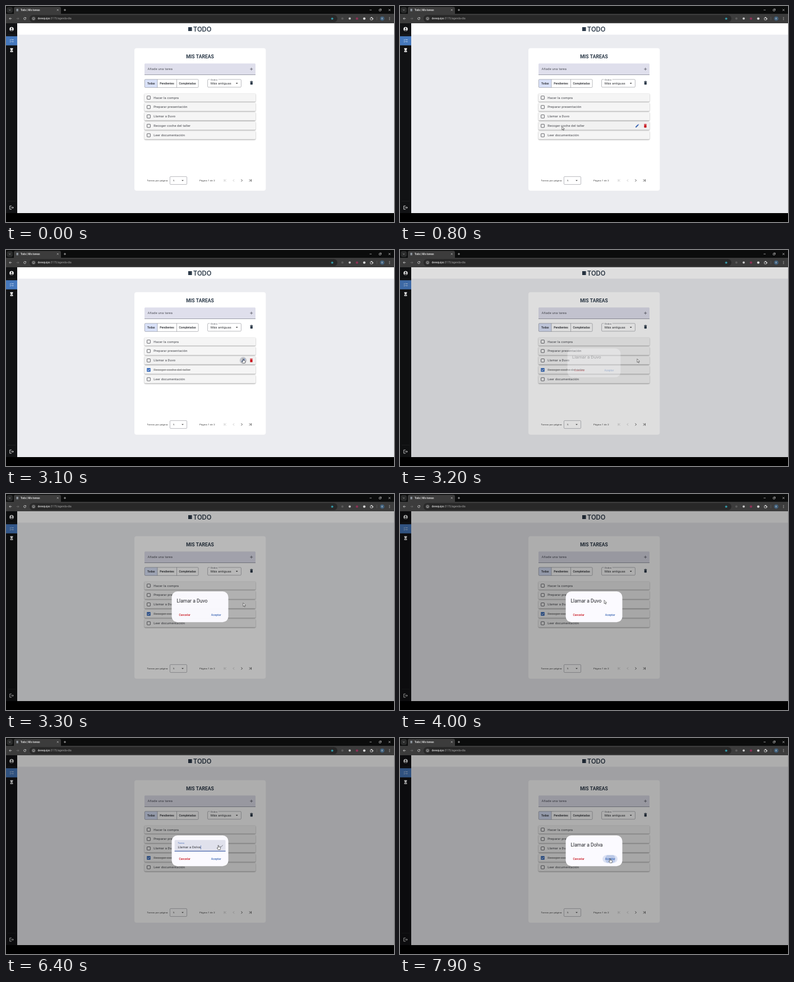
Write an HTML page with a canvas that moves like this. It is 692 px wide and 388 px high and loops after 8 s.

```html
<!DOCTYPE html>
<html lang="es">
<head>
<meta charset="utf-8">
<title>Mis tareas</title>
<style>
html, body { margin: 0; width: 100%; height: 100%; overflow: hidden; background: #000; }
canvas { display: block; width: 100vw; height: 100vh; }
</style>
</head>
<body>
<canvas id="stage"></canvas>
<script>
const W = 692, H = 388, LOOP = 8000;
const canvas = document.getElementById('stage');
const c = canvas.getContext('2d');
const INK = '#2c3a49', TEXT = '#3d3f45', BLUE = '#3b66b4', RED = '#c8101a', LINE = '#74777f';
const OLD_NAME = 'Duvo', NEW_NAME = 'Dolva', CALL = 'Llamar a ';
const OPEN = 3150, EDIT = 4080, SAVE = 6700;
const TASKS = ['Hacer la compra', 'Preparar presentación', CALL + OLD_NAME,
  'Recoger coche del taller', 'Leer documentación'];

const clamp = v => Math.max(0, Math.min(1, v));
const span = (t, a, b) => clamp((t - a) / (b - a));
const mix = (a, b, u) => a + (b - a) * u;
const smooth = u => u * u * (3 - 2 * u);
const rowY = i => 157.2 + i * 16.9;

function bezier(x1, y1, x2, y2) {
  const at = (a, b, s) => 3 * a * s * (1 - s) ** 2 + 3 * b * s * s * (1 - s) + s ** 3;
  return x => {
    let lo = 0, hi = 1;
    for (let i = 0; i < 20; i++) {
      const mid = (lo + hi) / 2;
      if (at(x1, x2, mid) < x) lo = mid; else hi = mid;
    }
    return at(y1, y2, lo);
  };
}
const fadeEase = bezier(.25, .8, .25, 1);
const growEase = bezier(0, 0, .2, 1);

function rect(x, y, w, h, color) {
  c.fillStyle = color;
  c.fillRect(x, y, w, h);
}
function round(x, y, w, h, r, fill, stroke, lw = .5) {
  c.beginPath();
  c.roundRect(x, y, w, h, r);
  if (fill) { c.fillStyle = fill; c.fill(); }
  if (stroke) { c.strokeStyle = stroke; c.lineWidth = lw; c.stroke(); }
}
function disc(x, y, r, color) {
  c.beginPath();
  c.arc(x, y, r, 0, 7);
  c.fillStyle = color;
  c.fill();
}
function ring(x, y, r, color, lw, a = 0, b = 7) {
  c.beginPath();
  c.arc(x, y, r, a, b);
  c.strokeStyle = color;
  c.lineWidth = lw;
  c.stroke();
}
// Points are offsets from (x, y).
function trace(x, y, pts, close) {
  c.beginPath();
  for (let i = 0; i < pts.length; i += 2) c.lineTo(x + pts[i], y + pts[i + 1]);
  if (close) c.closePath();
}
function line(x, y, pts, color, lw = .8) {
  trace(x, y, pts);
  c.strokeStyle = color;
  c.lineWidth = lw;
  c.stroke();
}
function poly(x, y, pts, color) {
  trace(x, y, pts, true);
  c.fillStyle = color;
  c.fill();
}
function text(s, x, cy, size, color, weight = 400, gap = 0, font = 'Roboto') {
  c.font = `${weight} ${size}px ${font}, sans-serif`;
  c.letterSpacing = gap + 'px';
  c.fillStyle = color;
  c.fillText(s, x, cy + size * .355);
  return c.measureText(s).width;
}

const plus = (x, y, r, color, lw) => {
  line(x, y, [-r, 0, r, 0], color, lw);
  line(x, y, [0, -r, 0, r], color, lw);
};
const drop = (x, y) => poly(x, y, [-1.8, -.9, 1.8, -.9, 0, .9], '#333');
const tick = (x, y, r, color, lw) => line(x, y, [-r, 0, -r * .3, r * .7, r, -r * .7], color, lw);
function trash(x, y, color) {
  rect(x - 2.5, y - 3, 5, .8, color);
  rect(x - 1, y - 3.4, 2, .6, color);
  round(x - 2.1, y - 1.8, 4.2, 5, .6, color);
}
function pencil(x, y) {
  poly(x, y, [-3, 3, -3, 1.6, 1, -2.4, 2.4, -1, -1.6, 3], BLUE);
  poly(x, y, [1.5, -2.8, 2.2, -3.3, 3.3, -2.2, 2.8, -1.5], BLUE);
}

function browser() {
  rect(0, 0, W, H, '#000');
  rect(0, 0, W, 14.5, '#0b0c0c');
  round(1.5, 2, 10.5, 10.5, 3, '#2b2c2c');
  line(6.7, 7.2, [-1.3, -.6, 0, .7, 1.3, -.6], '#ddd', .7);
  round(14, 1.5, 84, 15, [3, 3, 0, 0], '#3c3c3c');
  rect(0, 14, W, 17, '#3c3c3c');
  rect(18.5, 5, 3.4, 4.4, '#8d949c');
  text('Todo | Mis tareas', 26, 7.3, 4.5, '#eee', 500);
  line(92.3, 7.2, [-1.4, -1.4, 1.4, 1.4], '#ddd', .6);
  line(92.3, 7.2, [-1.4, 1.4, 1.4, -1.4], '#ddd', .6);
  plus(105, 7.2, 2, '#ddd', .7);
  line(650.3, 7.2, [-1.8, 0, 1.8, 0], '#eee', .6);
  round(665.5, 6, 3, 3, .3, null, '#eee', .6);
  line(667, 5.2, [-.3, 0, 2.3, 0, 2.3, 2.6], '#eee', .5);
  line(684, 7.2, [-1.7, -1.7, 1.7, 1.7], '#eee', .6);
  line(684, 7.2, [-1.7, 1.7, 1.7, -1.7], '#eee', .6);

  const y = 22.6;
  line(8, y, [2.2, 0, -2, 0], '#e4e4e4', .7);
  line(8, y, [-.2, -2, -2.1, 0, -.2, 2], '#e4e4e4', .7);
  line(20.8, y, [-2.2, 0, 2, 0], '#777', .7);
  line(20.8, y, [.2, -2, 2.1, 0, .2, 2], '#777', .7);
  ring(33.6, y, 2, '#e4e4e4', .7, .3, 5.6);
  poly(33.6, y, [2.4, -2.4, 2.4, -.3, .3, -.3], '#e4e4e4');
  round(42, 16.2, 549, 12.8, 6.4, '#282828');
  disc(49.2, y, 4, '#3c3c3c');
  ring(49.2, y, 2.1, '#ddd', .6);
  rect(48.9, y - .4, .6, 1.7, '#ddd');
  const w = text('devequipo', 56.4, y, 4.85, '#f2f2f2', 400);
  text(':3170/agenda-dia', 56.4 + w, y, 4.85, '#a3a3a3');
  const star = [];
  for (let i = 0; i < 10; i++) {
    const r = i % 2 ? 1.2 : 2.8, a = i * Math.PI / 5 - Math.PI / 2;
    star.push(r * Math.cos(a), r * Math.sin(a));
  }
  poly(581.8, y + .2, star, '#35a5b5');
  disc(600, y, 2, '#5b5b5b');
  disc(613, y, 2, '#c9c9c9');
  disc(626, y, 2.2, '#8c3155');
  disc(639, y, 2.2, '#d8d8d8');
  round(649.8, 21, 4, 4, .6, null, '#e4e4e4', .8);
  disc(652, 20.7, 1, '#e4e4e4');
  disc(654.2, 23, 1, '#e4e4e4');
  rect(661, 19.5, .5, 6, '#666');
  disc(671, y, 3.8, '#42617c');
  text('E', 669.8, y, 4, '#fff');
  for (const d of [-2, 0, 2]) disc(684, y + d, .55, '#e4e4e4');
}

function sidebar() {
  rect(0, 31, 20, 341, '#111214');
  rect(0, 54.3, 20, 16.4, '#4679bd');
  disc(10, 41.4, 3.7, '#fff');
  disc(10, 40.2, 1.2, '#111214');
  c.beginPath();
  c.ellipse(10, 43.5, 2.2, 1.1, 0, 0, 7);
  c.fill();
  rect(3, 51, 14, .4, '#333');
  for (const y of [60.7, 64]) {
    tick(8, y, 1.3, '#fff', .7);
    rect(10.4, y - .3, 3.2, .7, '#fff');
  }
  poly(10, 79.2, [-2.4, -3.5, 2.4, -3.5, 2.4, -1.5, .8, 0, 2.4, 1.5, 2.4, 3.5,
    -2.4, 3.5, -2.4, 1.5, -.8, 0, -2.4, -1.5], '#fff');
  poly(10, 80.5, [0, -.5, 1.4, .8, -1.4, .8], '#111214');
  rect(3, 350.5, 14, .4, '#333');
  line(9.5, 362.2, [.5, -3, -2.8, -3, -2.8, 3, .5, 3], '#fff', .8);
  line(9.5, 362.2, [-1, 0, 3.6, 0], '#fff', .8);
  line(9.5, 362.2, [2, -1.7, 3.8, 0, 2, 1.7], '#fff', .8);
}

function card() {
  rect(20, 31, W - 20, 341, '#ebecf0');
  rect(20, 31, W - 20, 20.5, '#fff');
  rect(325, 38, 6.6, 7, INK);
  text('TODO', 333.8, 41.6, 11.3, INK, 600, 0, 'Inter');
  round(229, 75.7, 234.3, 256, 4, '#fff');
  text('MIS TAREAS', 321.3, 91.2, 8.65, INK, 600);

  round(247, 103.3, 198, 20.5, [1.5, 1.5, 0, 0], '#dfdfec');
  rect(247, 123.2, 198, .6, '#6a6c78');
  text('Añade una tarea', 252.6, 113.4, 5.77, '#4a4c55', 400, .18);
  plus(437.7, 113.3, 2.5, '#44464f', .7);

  round(247.3, 131.8, 22.7, 14.6, [1.5, 0, 0, 1.5], '#d9e1f8');
  round(247.3, 131.8, 95.8, 14.6, 1.5, null, LINE);
  for (const x of [270, 304.3]) rect(x - .25, 131.8, .5, 14.6, LINE);
  text('Todas', 251.9, 139.2, 5.05, '#25272c', 500, .03);
  text('Pendientes', 274.2, 139.2, 5.05, '#25272c', 500, .03);
  text('Completadas', 308.5, 139.2, 5.05, '#25272c', 500, .03);

  round(359.6, 131.9, 59.8, 14, 1.5, null, LINE);
  rect(363.6, 131, 15, 2, '#fff');
  text('Orden', 365, 132.2, 4.3, '#4a4c55', 400, .14);
  text('Más antiguas', 365, 139, 5.77, '#26282c', 400, .18);
  drop(411.7, 139);
  trash(437.8, 138, INK);

  text('Tareas por página:', 251.6, 313.6, 4.3, '#333', 400, .14);
  round(292.4, 306.4, 30.2, 14.2, 1.5, null, LINE);
  text('5', 298, 313.6, 4.3, '#333');
  drop(315, 313.6);
  text('Página 1 de 2', 345, 313.6, 4.3, '#333', 400, .14);
  pager(391.5, -1, true, '#bbb');
  pager(406, -1, false, '#bbb');
  pager(420.5, 1, false, '#222');
  pager(435, 1, true, '#222');
}

function pager(x, dir, end, color) {
  line(x, 313.4, [-dir, -2, dir, 0, -dir, 2], color, .8);
  if (end) line(x + dir * 2.3, 313.4, [0, -2.2, 0, 2.2], color, .8);
}

function rows(t, pos) {
  TASKS.forEach((task, i) => {
    const y = rowY(i), cy = y + 7.3, done = i === 3 && t >= 1600;
    const hover = t < OPEN && pos && pos.x > 247 && pos.x < 445 && pos.y >= y && pos.y < y + 15;
    c.save();
    c.shadowColor = 'rgba(0,0,0,.45)';
    c.shadowBlur = 2;
    c.shadowOffsetY = .8;
    round(247, y, 198, 14.6, 1.4, hover ? '#f1f1f1' : '#f5f5f5');
    c.restore();

    if (i === 3) {
      const glow = span(t, 1500, 1650) * (1 - span(t, 2000, 2250));
      if (glow) disc(254.5, cy + .2, 7 * span(t, 1450, 1650), `rgba(70,85,130,${.2 * glow})`);
    }
    if (done) {
      round(251.2, cy - 3.1, 6.6, 6.6, .8, '#3f70bd');
      tick(254.5, cy + .2, 2, '#fff', .9);
    } else {
      round(251.6, cy - 2.8, 5.8, 5.8, .6, null, '#44464c', .8);
    }
    const fade = done ? span(t, 1600, 1850) : 0;
    const w = text(task, 263.2, cy, 5.77, fade > .7 ? '#858585' : fade ? '#6a6a6a' : TEXT, 400, .18);
    if (done) rect(263.2, cy + .1, w * span(t, 1600, 1820), .6, '#666');

    if (hover) {
      if (i === 2 && pos.x > 416) {
        disc(423, cy, 6.2, `rgba(50,60,85,${mix(.1, .24, span(t, 2900, 3080))})`);
      }
      pencil(423, cy);
      trash(437.5, cy, RED);
    }
  });
}

function typed(t) {
  if (t < 5000) return OLD_NAME;
  const keys = [5200, 5500, 5600, 6000, 6200];
  return NEW_NAME.slice(0, keys.filter(k => t >= k).length);
}

function caretOn(t) {
  if (t < 4200) return false;
  if (t < 5000) return t < 4700;
  return t < 5800 || (t >= 6000 && t < 6500);
}

function dialog(t) {
  const grow = growEase(span(t, OPEN, OPEN + 150));
  const scale = mix(.8, 1, grow);
  c.save();
  c.globalAlpha = span(t, OPEN, OPEN + 155);
  c.translate(346, 202.6);
  c.scale(scale, scale);
  c.translate(-346, -202.6);
  round(295.6, 175, 100.9, 55.3, 10, '#fbfaff');

  if (t >= EDIT && t < SAVE) {
    round(300.7, 183.2, 90.8, 20.6, [1.5, 1.5, 0, 0], '#e0e1ec');
    rect(300.7, 203.2, 90.8, .5, LINE);
    const half = 45.4 * growEase(span(t, EDIT, 4290));
    rect(346.1 - half, 202.7, half * 2, 1, '#3157ad');
    text('Tarea', 306.5, 188.6, 4.3, BLUE, 400, .14);
    const w = text(CALL + typed(t), 306.5, 196.2, 5.77, '#26282d', 400, .18);
    if (caretOn(t)) rect(306.5 + w, 193, .6, 7, '#3157ad');
    tick(384, 194.3, 2.6, '#44464f', .7);
  } else {
    text(CALL + (t < SAVE ? OLD_NAME : NEW_NAME), 304.4, 191.9, 8.65, '#1f2024');
  }

  text('Cancelar', 308.5, 217.4, 5.05, RED, 500, .03);
  const over = span(t, 7560, 7680);
  if (over) {
    round(361.3, 210.2, 26.6, 14.2, 7.1, `rgba(59,102,180,${.16 * over})`);
    const press = span(t, 7740, 7900);
    if (press) {
      c.save();
      c.beginPath();
      c.roundRect(361.3, 210.2, 26.6, 14.2, 7.1);
      c.clip();
      disc(375, 217.3, 9 * press, 'rgba(59,102,180,.2)');
      c.restore();
    }
  }
  text('Aceptar', 365.7, 217.4, 5.05, BLUE, 500, .03);
  c.restore();
}

// Later moves: start, end, x, y.
const MOVES = [[1850, 2380, 423, 195.6], [3450, 4050, 363, 190.6],
  [6180, 6500, 383.5, 193.6], [7380, 7700, 374.8, 216.6]];

function pointer(t) {
  if (t < 100) return null;
  const u = 1 - (1 - span(t, 100, 960)) ** 2, v = 1 - u;
  let x = v * v * 124 + 2 * u * v * 290 + u * u * 289;
  let y = v * v * 303 + 2 * u * v * 275 + u * u * 212;
  for (const [a, b, tx, ty] of MOVES) {
    const k = smooth(span(t, a, b));
    x = mix(x, tx, k);
    y = mix(y, ty, k);
  }
  const hand = (t >= 950 && t < OPEN) || (t >= 6400 && t < SAVE) || t >= 7600;
  return { x, y, hand };
}

function drawPointer({ x, y, hand }) {
  const shape = hand
    ? [-.7, 0, .5, 0, .6, 2.7, 3.1, 3.3, 3.7, 4.1, 3.2, 7.6, -.6, 7.6, -2.6, 4.8, -2.1, 4.2, -.7, 5]
    : [0, 0, 0, 6.2, 1.4, 5, 2.4, 7.2, 3.4, 6.8, 2.5, 4.6, 4.4, 4.5];
  c.lineJoin = 'round';
  poly(x, y, shape, '#fff');
  c.strokeStyle = '#222';
  c.lineWidth = .6;
  c.stroke();
  c.lineJoin = 'miter';
}

function draw(t) {
  const pos = pointer(t);
  browser();
  card();
  rows(t, pos);
  sidebar();
  if (t >= OPEN) {
    rect(0, 31, W, 341, `rgba(0,0,0,${.32 * fadeEase(span(t, OPEN, OPEN + 400))})`);
    dialog(t);
  }
  if (pos) drawPointer(pos);
}

function resize() {
  const dpr = window.devicePixelRatio || 1;
  canvas.width = Math.round(innerWidth * dpr);
  canvas.height = Math.round(innerHeight * dpr);
}
addEventListener('resize', resize);
resize();

const start = performance.now();
function loop() {
  c.setTransform(canvas.width / W, 0, 0, canvas.height / H, 0, 0);
  draw((performance.now() - start) % LOOP);
  requestAnimationFrame(loop);
}
loop();
</script>
</body>
</html>
```
